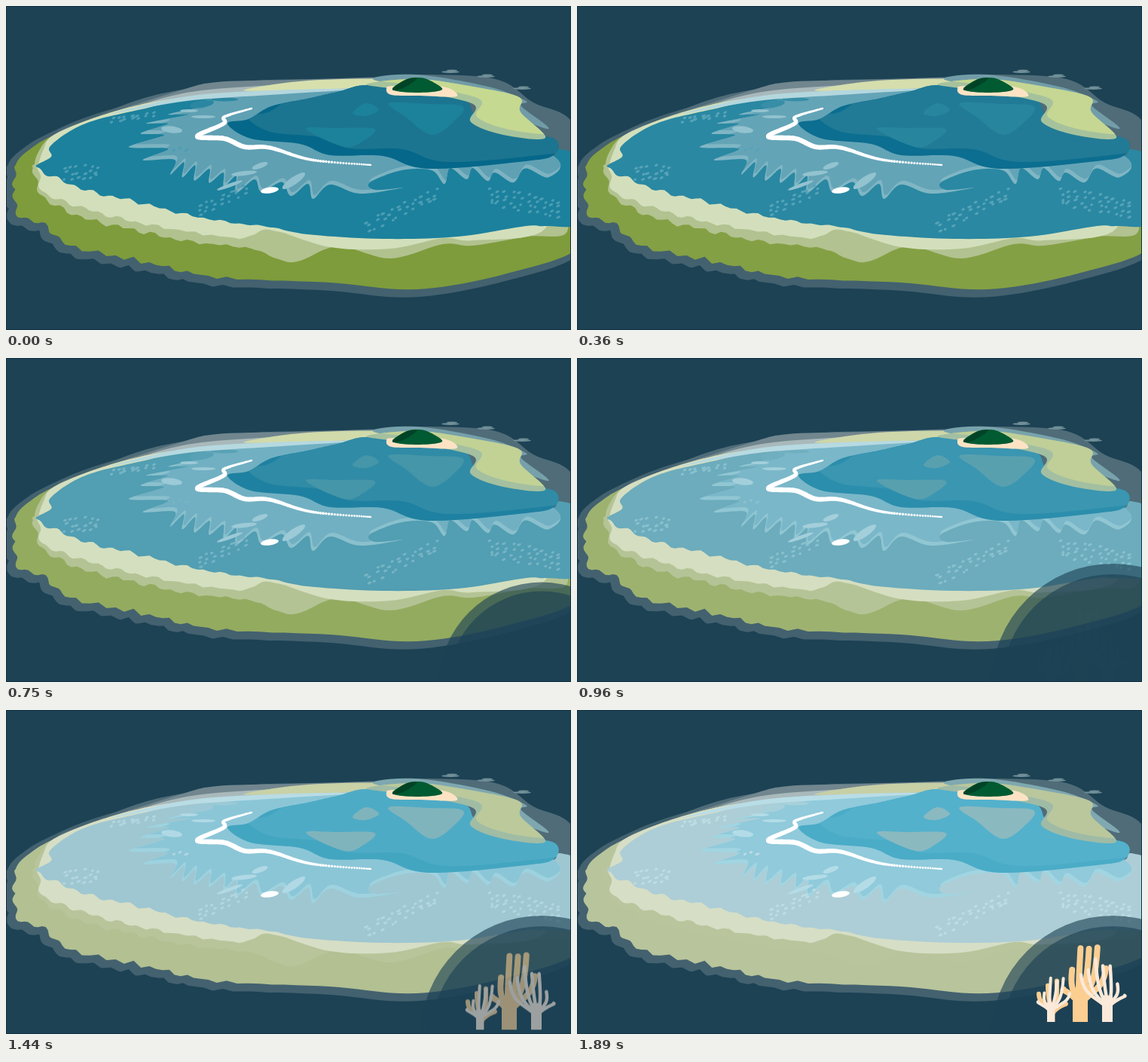
An HTML page with a canvas that plays this animation: 750x430 px, repeating every 2970 ms.

```html
<!DOCTYPE html>
<html lang="en">
<head>
<meta charset="utf-8">
<title>Bleaching reef</title>
<style>
  html, body { margin: 0; width: 100%; height: 100%; overflow: hidden; background: #1c4254; }
  canvas { display: block; width: 100vw; height: 100vh; }
</style>
</head>
<body>
<canvas id="stage" width="750" height="430"></canvas>
<script>
const ctx = document.getElementById('stage').getContext('2d');
const LOOP = 2970, STEP = 30, SEA = '#1c4254';
const clamp = x => Math.max(0, Math.min(1, x));
const sineInOut = x => (1 - Math.cos(Math.PI * clamp(x))) / 2;
const quartOut = x => 1 - (1 - clamp(x)) ** 4;

let seed = 11;
const random = () => (seed = seed * 16807 % 2147483647) / 2147483647;

const parse = text => text.split(' ').map(p => p.split(',').map(Number));

// Points of a Catmull-Rom curve through a few key points
function sample(keys, closed = true, perSpan = 10) {
  const n = keys.length, spans = closed ? n : n - 1, out = [];
  const at = i => keys[closed ? (i + n) % n : Math.max(0, Math.min(n - 1, i))];
  for (let i = 0; i < spans; i++) for (let k = 0; k < perSpan; k++) {
    const u = k / perSpan, [a, b, c, d] = [at(i - 1), at(i), at(i + 1), at(i + 2)];
    out.push([0, 1].map(j => b[j] + u / 2 * (c[j] - a[j] +
      u * (2 * a[j] - 5 * b[j] + 4 * c[j] - d[j] + u * (3 * (b[j] - c[j]) + d[j] - a[j])))));
  }
  return closed ? out : [...out, keys[n - 1]];
}

// Scallops along the lower shore, dying out to the right
function ripple(points, size) {
  let s = 0;
  return points.map(([x, y], i) => {
    const [px, py] = points[(i || points.length) - 1], [nx, ny] = points[(i + 1) % points.length];
    const len = Math.hypot(nx - px, ny - py) || 1;
    s += len / 2;
    const push = y < 212 ? 0 : size * clamp((400 - x) / 220) * (Math.sin(s / 4) + 0.5 * Math.sin(s / 7));
    return [x + (ny - py) / len * push, y - (nx - px) / len * push];
  });
}

function outline(points, closed = true) {
  const path = new Path2D();
  points.forEach(p => path.lineTo(...p));
  if (closed) path.closePath();
  return path;
}
const blob = (text, size = 0) => outline(ripple(sample(parse(text)), size));

// Tongues reaching out from a line by about (dx, dy)
function fringe(text, count, dx, dy) {
  const line = sample(parse(text), false, 20);
  const at = u => line[Math.round(u * (line.length - 1))];
  return Array.from({ length: count }, (_, i) => {
    const tip = at((i + 0.6) / count), reach = 0.75 + random() * 0.5;
    return [at(i / count), [tip[0] + dx * reach, tip[1] + dy * reach]];
  }).flat();
}

function ovals(list) {
  const path = new Path2D();
  for (const [x, y, rx, ry, turn = 0] of list) {
    path.moveTo(x + rx * Math.cos(turn), y + rx * Math.sin(turn));
    path.ellipse(x, y, rx, ry, turn, 0, 7);
  }
  return path;
}

// Loose slanted rows of specks
function specks(x, y, w, h, slant) {
  const cols = Math.ceil(w / 10), rows = Math.ceil(h / 7), list = [];
  for (let r = 0; r < rows; r++) for (let c = 0; c < cols; c++) {
    const u = (c + random() * 0.7) / cols, v = (r + random() * 0.7) / rows;
    list.push([x + u * w, y + v * h + u * slant, 2 + random() * 1.2, 1.6, -0.4]);
  }
  return list;
}

// A layer has a healthy and a bleached colour; an inset layer is its own
// path shifted by [dx, dy] and clipped to the unshifted one.
const hex = c => [1, 3, 5].map(i => parseInt(c.substr(i, 2), 16));
const layers = [];
const layer = (path, from, to = from, options = {}) =>
  layers.push({ path, from: hex(from), to: hex(to), ...options });

const ARC = '62,172 110,151 170,133 240,119 320,113 470,113 700,205';
const reef = blob('12,240 14,208 36,187 ' + ARC + ' 764,250 764,318 665,355 545,376 430,367 280,360 190,341 85,318 55,293 15,275', 2.8);
const sand = blob('38,215 44,192 ' + ARC + ' 746,296 690,306 620,318 580,316 510,335 440,319 380,340 325,322 240,312 170,297 100,280 48,252', 2.5);
const paleSand = blob('43,215 50,190 ' + ARC + ' 716,295 620,311 580,308 510,322 430,320 350,297 310,308 210,294 140,279 85,262 50,247', 2);
const lagoon = blob('40,212 60,200 58,187 85,166 120,151 180,137 240,124 320,117 470,111 700,195 735,190 764,208 764,285 715,292 690,292 600,306 500,309 400,303 350,293 310,289 240,277 170,259 115,247 70,230 48,219', 2);
const midWater = outline(sample([
  ...fringe('285,122 258,138 216,156 212,180 224,204', 6, -42, 5),
  ...fringe('224,204 270,216 330,230 430,238', 9, -12, 18),
  ...parse('430,237 470,249 527,241 490,244 483,234 525,218'),
  ...fringe('565,218 610,214 660,221 728,205', 5, 4, 17),
  ...parse('728,200 600,140 480,107 400,114')
]));
const deep = blob('294,156 322,150 352,133 400,123 440,114 488,105 600,121 622,145 650,168 725,175 728,197 690,206 560,216 500,199 430,198 390,183 325,176');
const cay = blob('478,104 545,97 620,107 681,121 683,141 716,175 660,171 617,154 620,130 540,113');

layer(reef, '#43616f', '#43616f', { halo: 13 });
layer(blob('228,112 330,99 470,96 545,91 650,97 700,128 748,150 770,205 600,190 300,150 110,154 70,169 160,130'), '#4f6c78');
layer(blob('228,113 280,101 380,98 510,95 470,106 300,113 170,134 110,151'), '#71868e');
layer(reef, '#7e9c3b', '#b8c49b');
layer(sand, '#b1c28f', '#b9c59c');
layer(paleSand, '#d3dfbb', '#d6dec6');
layer(lagoon, '#1c819d', '#adced6');
layer(midWater, '#7db3c1', '#a1d5e2');
layer(midWater, '#5fa0b3', '#90cadb', { inset: [2, -5] });
layer(ovals([[260, 130, 16, 5, -0.15], [290, 124, 18, 2.5]]), '#2b87a1', '#a8d0da');
layer(blob('190,128 260,112 400,103 480,104 470,110 250,121'), '#a9b9bb');
layer(blob('315,112 400,99 520,97 490,107 400,111'), '#d7e0ad', '#c7cfa5');
layer(blob('140,143 240,120 350,112 470,110 350,118 240,126'), '#b4d6dd', '#b9dde6');
layer(blob('488,98 545,91 640,107 690,126 684,133 718,163 600,118'), '#719ca7', '#7fa8b0');
layer(deep, '#05688a', '#4aacc7');
layer(deep, '#1c7590', '#53b1cc', { inset: [26, -9] });
layer(cay, '#a7c39c', '#9fbba6');
layer(cay, '#c6d991', '#bac79c', { inset: [8, -7] });
for (const patch of ['398,163 440,162 489,163 476,178 449,187', '508,129 560,130 606,133 596,152 565,171 530,147', '460,142 478,129 495,138 477,146'])
  layer(blob(patch), '#1c819a', '#8bb9c0');
layer(blob('505,110 515,106 580,107 598,120 550,119 512,118'), '#fde3c4');
layer(blob('513,111 530,98 546,95 561,98 579,111 546,115'), '#005a32');
layer(blob('513,111 530,98 546,96 527,109'), '#004326');
layer(ovals([
  ...specks(75, 213, 52, 20, -3), ...specks(138, 149, 62, 8, -10),
  ...specks(253, 266, 70, 16, -32), ...specks(478, 284, 98, 20, -46),
  ...specks(640, 240, 100, 26, 18), ...specks(217, 189, 27, 6, -1)
]), '#4c9db3', '#bddce4');
layer(ovals([[220, 164, 14, 4.5, 0.12], [243, 139, 12, 2], [262, 147, 16, 2], [337, 212, 11, 3.5, -0.35],
  [316, 222, 17, 3, -0.12], [297, 238, 18, 2.5, -0.35], [382, 232, 18, 5, -0.6]]), '#8fc0cd', '#b3dce7');

// Foam line, thin at both ends
const foam = sample(parse('326,136 290,147 289,156 254,173 290,176 317,187 350,188 405,204 484,211'), false, 24);
layer(ovals(foam.map(([x, y], i) => {
  const r = 1.2 + 2.1 * Math.sin(Math.PI * i / (foam.length - 1));
  return [x, y, r, r];
})), '#ffffff');
layer(ovals([[350, 244.5, 12, 4, -0.15]]), '#ffffff');
for (const [x, y] of [[590, 87], [637, 93], [685, 109]])
  layer(ovals([[x, y + 0.5, 12, 1.5], [x + 2, y - 1.5, 7, 1]]), '#718f98');

// The corals are painted once on their own canvas so that they fade evenly
const coralCanvas = Object.assign(document.createElement('canvas'), { width: 750, height: 430 });
const coralCtx = coralCanvas.getContext('2d');

function coral(x, height, spread, lean, count, width, trunk, color) {
  const base = 414, c = coralCtx;
  c.strokeStyle = c.fillStyle = color;
  c.lineCap = 'round';
  c.lineWidth = width;
  c.fillRect(x - trunk / 2, base - height * 0.42, trunk, height * 0.42);
  for (let i = 0; i < count; i++) {
    const u = 2 * i / (count - 1) - 1;
    const tipX = x + u * spread + lean, tipY = base - height * (1 - 0.4 * (u - lean / spread) ** 2) + 8 * (i % 2);
    c.beginPath();
    c.moveTo(x, base - height * 0.22);
    c.bezierCurveTo(x + u * spread * 0.5, base - height * 0.4, tipX - lean / 2, base - height * 0.4, tipX, tipY);
    c.stroke();
  }
}
coral(668, 105, 28, 6, 6, 8, 20, '#fbce91');
coral(632, 58, 18, -1, 4, 6, 5, '#fbce91');
coral(629, 62, 21, 4, 6, 4, 10, '#fbe9d9');
coral(704, 84, 29, -6, 7, 4.5, 14, '#fbe9d9');

function drawLayer({ path, from, to, halo, inset }, bleach) {
  ctx.save();
  ctx.fillStyle = ctx.strokeStyle = `rgb(${from.map((v, i) => Math.round(v + (to[i] - v) * bleach))})`;
  if (inset) {
    ctx.clip(path);
    ctx.translate(...inset);
  }
  if (halo) {
    ctx.translate(-5, 4);
    ctx.lineWidth = halo;
    ctx.lineJoin = 'round';
    ctx.stroke(path);
  }
  ctx.fill(path);
  ctx.restore();
}

function drawLens(scale) {
  ctx.globalAlpha = 0.62;
  ctx.fillStyle = SEA;
  for (const radius of [161, 147]) {
    ctx.beginPath();
    ctx.arc(711, 434, radius * scale, 0, 7);
    ctx.fill();
  }
}

function draw(t) {
  const bleach = sineInOut(t / 1800), rise = sineInOut((t - 900) / 990);
  ctx.globalAlpha = 1;
  ctx.fillStyle = SEA;
  ctx.fillRect(0, 0, 750, 430);
  layers.forEach(item => drawLayer(item, bleach));
  drawLens(quartOut((t - 600) / 400));
  ctx.globalAlpha = rise;
  ctx.drawImage(coralCanvas, 0, 24 * (1 - rise));
  ctx.globalAlpha = 1;
  ctx.strokeStyle = '#153545';
  ctx.strokeRect(0.5, 0.5, 749, 429);
}

function tick() {
  const t = Math.floor(performance.now() % LOOP / STEP) * STEP;
  draw(t < 60 ? 0 : t);
  requestAnimationFrame(tick);
}
tick();
</script>
</body>
</html>
```
